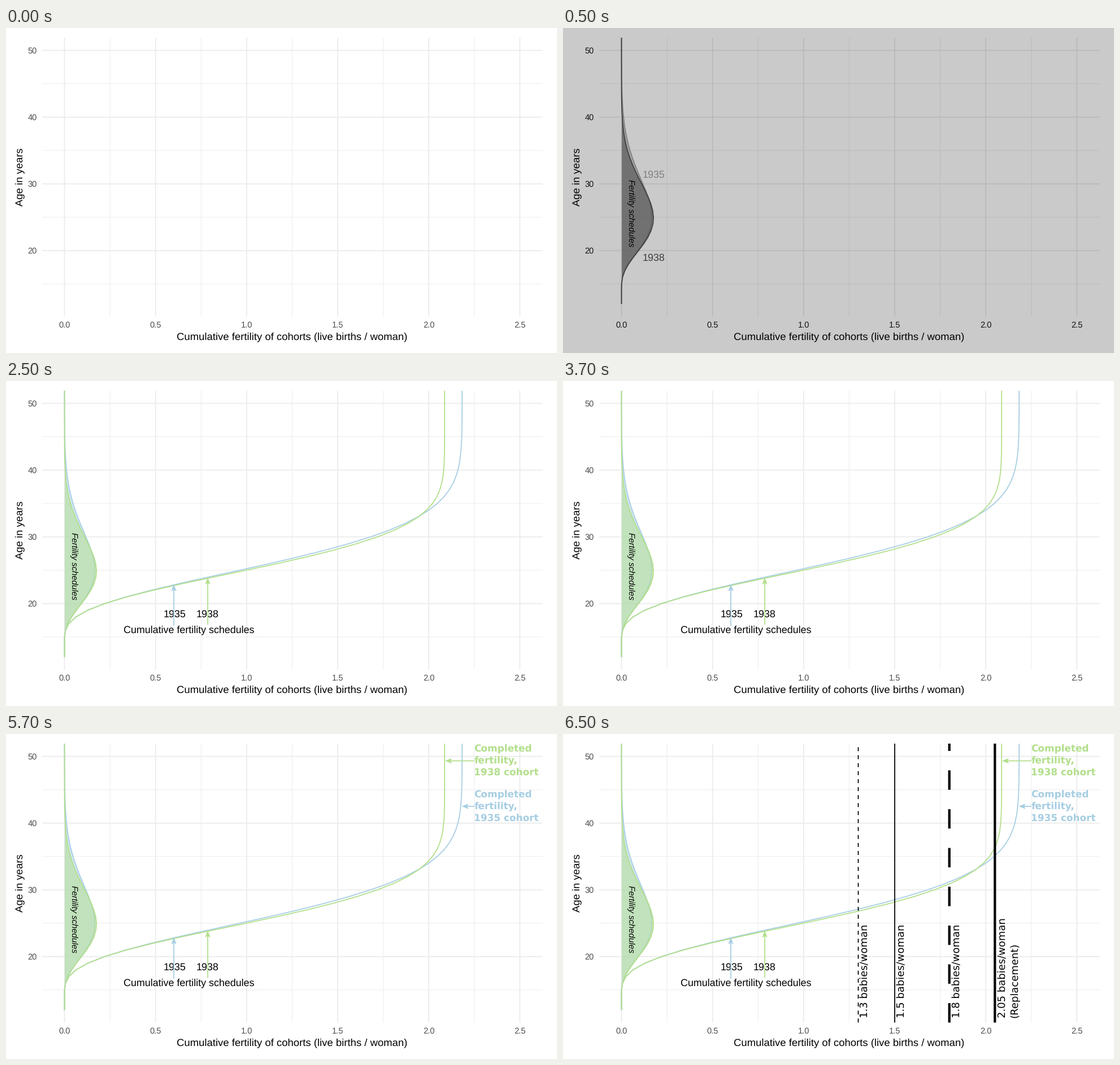
A matplotlib script that plays this animation: 975 by 575 pixels, repeating every 8000 ms.

```python
from itertools import count

import matplotlib.pyplot as plt
import numpy as np
from matplotlib.animation import FuncAnimation

W, H, DPI = 975, 575, 100
PT = 72 / DPI  # points per pixel
LEFT, RIGHT, TOP, BOTTOM = 64, 949.5, 17, 510.5
THIN, THICK = 1.765, 4.29

plt.rcParams.update({
    "path.snap": False,
    "lines.solid_capstyle": "butt",
    "text.hinting": "none",
})

COLOUR = dict(back="#ffffff", grid="#ebebeb", tick="#4d4d4d",
              c1935="#a6cee3", c1938="#b2df8a")
GREY = dict(back="#cacaca", grid="#b9b9b9", tick="#111111",
            c1935="#808080", c1938="#404040")

# Beta-shaped fertility by age, scaled to the completed total.
COHORTS = {
    1935: dict(start=14.5, end=65, rise=3.0, fall=11.4, total=2.183),
    1938: dict(start=14, end=55, rise=3.52, fall=9.75, total=2.087),
}
AGES = np.append(np.arange(12, 52), 51.9)


def schedule(start, end, rise, fall, total):
    rate = np.clip(AGES - start, 0, None) ** rise * (end - AGES) ** fall
    return total * rate / rate.sum()


def px(value):
    return 103.5 + 322.3 * np.asarray(value)


def py(age):
    return 39.6 + 11.807 * (50 - np.asarray(age))


fig = plt.figure(figsize=(W / DPI, H / DPI), dpi=DPI)
ax = fig.add_axes([0, 0, 1, 1])
order = count()


def line(xs, ys, color, width=THIN, **kw):
    ax.plot(xs, ys, color=color, lw=width * PT, zorder=next(order), **kw)


def label(x, y, text, size=17.9, color="black", font="Liberation Sans",
          ha="left", **kw):
    ax.text(x, y, text, fontsize=size * PT, color=color, family=font, ha=ha,
            va="baseline", rotation_mode="anchor", zorder=next(order), **kw)


def arrow(tail, tip, color, length=12, half=4.8, notch=9.5):
    tail, tip = np.array(tail, float), np.array(tip, float)
    along = (tail - tip) / np.hypot(*(tail - tip))
    side = half * np.array([-along[1], along[0]])
    neck = tip + notch * along
    line(*zip(tail, neck), color)
    barb = tip + length * along
    ax.fill(*zip(tip, barb + side, neck, barb - side), color=color, lw=0,
            zorder=next(order))


def draw_grid(theme):
    ax.fill([0, W, W, 0], [0, 0, H, H], color=theme["back"], lw=0,
            zorder=next(order))
    values, ages = np.arange(0, 2.6, 0.5), np.arange(20, 51, 10)
    for width, xs, ys in [(THIN / 2, values[:-1] + 0.25, ages - 5),
                          (THIN, values, ages)]:
        for y in py(ys):
            line([LEFT, RIGHT], [y, y], theme["grid"], width)
        for x in px(xs):
            line([x, x], [TOP, BOTTOM], theme["grid"], width)
    for value in values:
        label(px(value), 530, f"{value:.1f}", 14.67, theme["tick"], ha="center")
    for age in ages:
        label(55, py(age) + 5.4, str(age), 14.67, theme["tick"], ha="right")
    label(506.5, 551.4, "Cumulative fertility of cohorts (live births / woman)",
          18.5, ha="center")
    label(29.4, 264, "Age in years", 18.5, ha="center", rotation=90)


def draw_schedules(theme):
    for cohort, shape in COHORTS.items():
        color = theme[f"c{cohort}"]
        xs, ys = px(schedule(**shape)), py(AGES)
        ax.fill_betweenx(ys, px(0), xs, color=color, alpha=0.5, lw=0,
                         zorder=next(order))
        line(xs, ys, color)
    label(116, 268, "Fertility schedules", 14.9, style="italic", rotation=270)


def draw_cumulative(theme):
    for cohort, shape in COHORTS.items():
        line(px(np.cumsum(schedule(**shape))), py(AGES), theme[f"c{cohort}"])
    label(208, 445.6, "Cumulative fertility schedules")
    label(298.3, 418.3, "1935", ha="center")
    label(357, 418.3, "1938", ha="center")
    arrow((297, 433), (297, 360), theme["c1935"])
    arrow((357, 431.5), (357, 348), theme["c1938"])


def draw_completed(theme):
    for cohort, base, tip, level in [(1938, 31.6, 777, 47.5),
                                     (1935, 112.3, 806.5, 128)]:
        color = theme[f"c{cohort}"]
        arrow((829, level), (tip, level), color)
        for i, row in enumerate(["Completed", "fertility,", f"{cohort} cohort"]):
            label(828.5, base + 21 * i, row, 16.9, color, "DejaVu Sans",
                  weight="bold")


def draw_thresholds():
    def caption(baseline, text):
        label(baseline, 502.5, text, 18, font="DejaVu Sans", rotation=90)

    for value, width, dash in [(1.3, THIN, (0, (4, 4))), (1.5, THIN, "-"),
                               (1.8, THICK, (0, (8, 8))), (2.05, THICK, "-")]:
        x = px(value)
        line([x, x], [BOTTOM, TOP], "black", width, ls=dash,
             dash_capstyle="butt")
        caption(x + 15.7 + 0.7 * width, f"{value} babies/woman")
    caption(805, "(Replacement)")


def draw(frame):
    time = frame * 500
    theme = GREY if 500 <= time < 2500 else COLOUR
    ax.clear()
    ax.axis("off")
    draw_grid(theme)
    if time >= 500:
        draw_schedules(theme)
    if theme is GREY:
        label(141, 265.3, "1935", color=theme["c1935"])
        label(141, 411.7, "1938", color=theme["c1938"])
    if time >= 2500:
        draw_cumulative(theme)
    if time >= 4500:
        draw_completed(theme)
    if time >= 6500:
        draw_thresholds()
    ax.set(xlim=(0, W), ylim=(H, 0))


animation = FuncAnimation(fig, draw, frames=16, interval=500, repeat=True,
                          init_func=lambda: draw(0))
plt.show()
```
